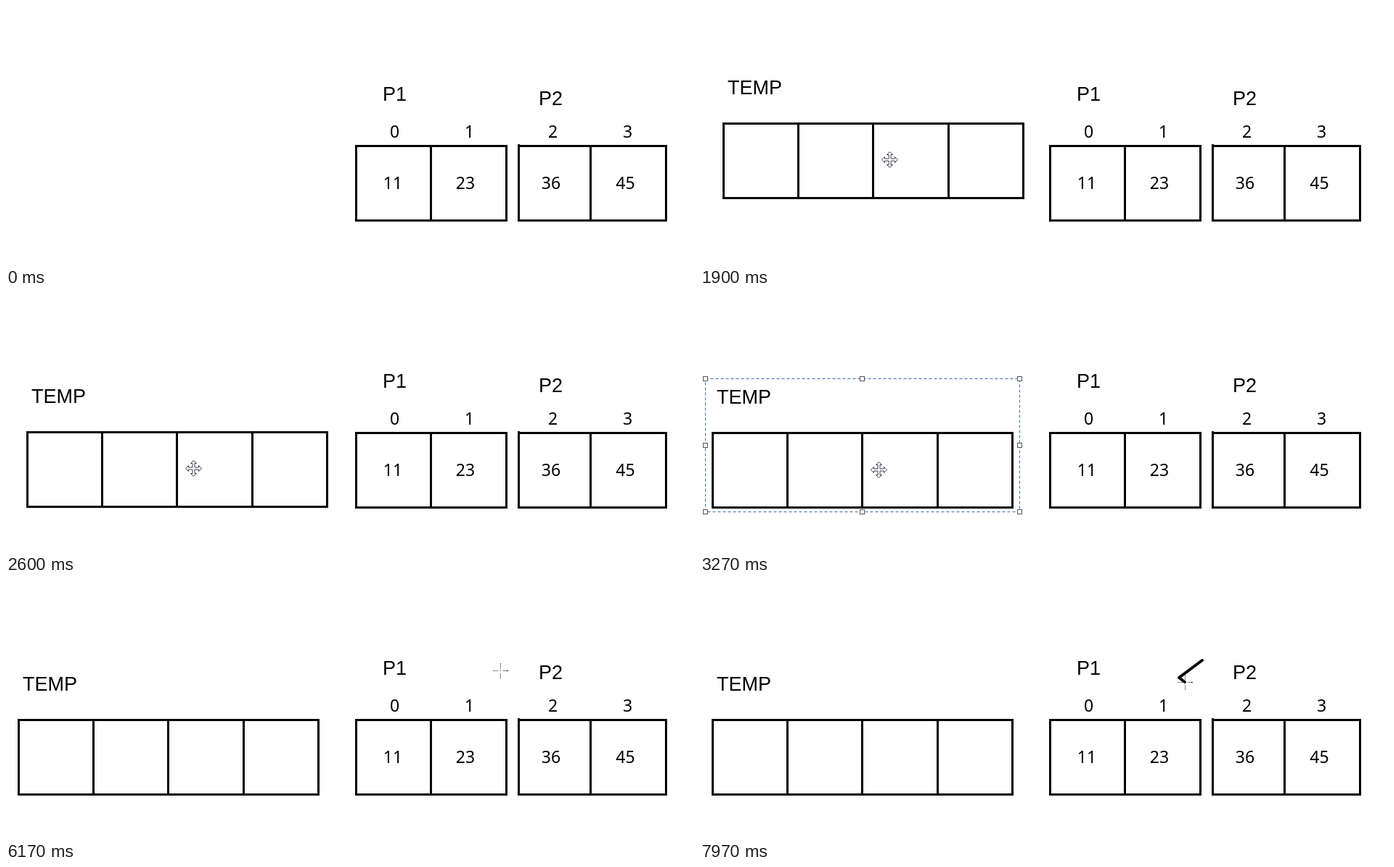
Animation of 948x358 px, one loop 8000 ms. Source, as an HTML page with a canvas:

```html
<!DOCTYPE html>
<html lang="en">
<head>
<meta charset="utf-8">
<title>Merging two parts</title>
<style>
  html, body { margin: 0; width: 100%; height: 100%; overflow: hidden; background: #fff; }
  canvas { display: block; }
</style>
</head>
<body>
<canvas id="stage" width="948" height="358"></canvas>
<script>
const ctx = document.getElementById('stage').getContext('2d');
const LOOP = 8000;
const LABEL = '27px "Liberation Sans", sans-serif';
const DIGIT = '23px "Noto Sans", sans-serif';

const GRIP = { x: 246, y: 243 };
const PEN_START = { x: 692, y: 111 };
const PEN_CORNER = { x: 660, y: 135 };
const PEN_TIP = { x: 668, y: 141 };

// The dragged row swings in from the left, overshoots and settles at zero.
const drag = [
  { t: 1170, x: -250, y: -60 }, { t: 1530, x: -61, y: -67 }, { t: 1900, x: 15, y: -31 },
  { t: 2200, x: 32, y: -12 }, { t: 2600, x: 12, y: -1 }, { t: 2900, x: 0, y: 0 }
];
// The pen dips in from the top, sweeps left and returns to its start.
const hover = [
  { t: 5300, x: 285, y: 34 }, { t: 5650, x: 430, y: 240 }, { t: 6100, x: 747, y: 126 },
  { t: 6170, x: 682, y: 125 }, { t: 6400, x: 540, y: 125 }, { t: 6930, x: 704, y: 124 },
  { t: 7200, ...PEN_START }
];

const clamp = u => Math.min(1, Math.max(0, u));
const smooth = u => u * u * (3 - 2 * u);
const add = (a, b) => ({ x: a.x + b.x, y: a.y + b.y });
const mix = (a, b, u) => ({ x: a.x + (b.x - a.x) * u, y: a.y + (b.y - a.y) * u });
const snap = p => ({ x: Math.round(p.x), y: Math.round(p.y) });
const progress = (t, from, to) => clamp((t - from) / (to - from));

// Monotone cubic through the key points: smooth, without overshoot.
function along(keys, t) {
  const last = keys.length - 1;
  if (t >= keys[last].t) return keys[last];
  const i = keys.findIndex(k => k.t > t) - 1;
  const a = keys[i], b = keys[i + 1], span = b.t - a.t, u = (t - a.t) / span;
  const coordinate = axis => {
    const slope = j => j < 0 || j >= last ? 0
      : (keys[j + 1][axis] - keys[j][axis]) / (keys[j + 1].t - keys[j].t);
    const tangent = j => {
      if (j === 0) return slope(0);
      const before = slope(j - 1), after = slope(j);
      return before * after <= 0 ? 0 : 2 * before * after / (before + after);
    };
    const bend = u * (1 - u) * ((1 - u) * tangent(i) - u * tangent(i + 1));
    return a[axis] + (b[axis] - a[axis]) * smooth(u) + span * bend;
  };
  return { x: coordinate('x'), y: coordinate('y') };
}

function text(str, x, y, font, align = 'left') {
  ctx.font = font;
  ctx.textAlign = align;
  ctx.fillStyle = '#000';
  ctx.fillText(str, x, y);
}

function row(left, top, step, count) {
  ctx.fillStyle = '#000';
  for (let i = 0; i <= count; i++) ctx.fillRect(Math.round(left + i * step), top, 3, 106);
  const width = Math.round(left + count * step) + 3 - left;
  ctx.fillRect(left, top, width, 3);
  ctx.fillRect(left, top + 103, width, 3);
}

function captions(first, values, center, valueStep) {
  values.forEach((value, i) => {
    text(first + i, center + i * 103, 182, DIGIT, 'center');
    text(value, center - 2.5 + i * valueStep, 253, DIGIT, 'center');
  });
}

function parts() {
  row(481, 192, 103.4, 2);
  text('P1', 519, 131, LABEL);
  captions(0, [11, 23], 535.5, 100);

  row(705, 192, 99, 1);
  row(804, 192, 104, 1);
  ctx.fillRect(705, 191, 3, 1);
  text('P2', 734, 137, LABEL);
  captions(2, [36, 45], 753.5, 102.5);
}

function temp({ x, y }) {
  row(16 + x, 192 + y, 103.2, 4);
  text('TEMP', 23 + x, 153 + y, LABEL);
}

function selection() {
  const left = 7.5, top = 118.5, width = 433, height = 184;
  ctx.strokeStyle = '#3c6ea8';
  ctx.lineWidth = 1;
  ctx.setLineDash([4, 3]);
  ctx.strokeRect(left, top, width, height);
  ctx.setLineDash([]);
  ctx.strokeStyle = '#555';
  ctx.fillStyle = '#fff';
  for (let i = 0; i < 9; i++) {
    if (i === 4) continue;
    const x = left + Math.floor(width * (i % 3) / 2) - 3;
    const y = top + height * Math.floor(i / 3) / 2 - 3;
    ctx.fillRect(x, y, 6, 6);
    ctx.strokeRect(x, y, 6, 6);
  }
}

function moveCursor({ x, y }) {
  ctx.save();
  ctx.translate(x + 0.5, y + 0.5);
  ctx.beginPath();
  for (let arm = 0; arm < 4; arm++) {
    ctx.lineTo(-1.5, -1.5);
    ctx.lineTo(-1.5, -7);
    ctx.lineTo(-4, -7);
    ctx.lineTo(0, -11);
    ctx.lineTo(4, -7);
    ctx.lineTo(1.5, -7);
    ctx.rotate(Math.PI / 2);
  }
  ctx.closePath();
  ctx.fillStyle = '#fff';
  ctx.fill();
  ctx.strokeStyle = '#3d3d50';
  ctx.lineWidth = 1;
  ctx.stroke();
  ctx.restore();
}

function crossCursor({ x, y }) {
  ctx.fillStyle = '#222';
  for (let d = -10; d <= 10; d += 2) {
    if (Math.abs(d) === 2) continue;
    ctx.fillRect(x + d, y, 1, 1);
    ctx.fillRect(x, y + d, 1, 1);
  }
  ctx.fillRect(x + 9, y, 2, 1);
}

// Draws both legs of the pen mark as far as they go and returns the pen position.
function penMark(t) {
  if (t < 7280) return along(hover, t);
  const corner = mix(PEN_START, PEN_CORNER, smooth(progress(t, 7280, 7770)));
  const tip = add(corner, mix({ x: 0, y: 0 },
    { x: PEN_TIP.x - PEN_CORNER.x, y: PEN_TIP.y - PEN_CORNER.y }, progress(t, 7870, 7970)));
  ctx.beginPath();
  ctx.moveTo(PEN_START.x, PEN_START.y);
  ctx.lineTo(corner.x, corner.y);
  ctx.lineTo(tip.x, tip.y);
  ctx.strokeStyle = '#000';
  ctx.lineWidth = 4;
  ctx.lineCap = ctx.lineJoin = 'round';
  ctx.stroke();
  return tip;
}

function draw(t) {
  ctx.fillStyle = '#fff';
  ctx.fillRect(0, 0, 948, 358);
  parts();
  if (t < 1170) return;

  const offset = snap(along(drag, t));
  temp(offset);
  if (t >= 3270 && t < 3900) selection();

  if (t < 3270) {
    moveCursor(add(GRIP, offset));
  } else if (t < 3430) {
    const spot = snap(mix(GRIP, { x: 282, y: 350 }, progress(t, 3270, 3430)));
    (spot.y < 302 ? moveCursor : crossCursor)(spot);
  } else if (t >= 4300 && t < 4400) {
    crossCursor(snap(mix({ x: 190, y: 318 }, { x: 59, y: 135 }, progress(t, 4300, 4370))));
  } else if (t >= 5300) {
    crossCursor(snap(penMark(t)));
  }
}

function tick() {
  draw(performance.now() % LOOP);
  requestAnimationFrame(tick);
}
tick();
</script>
</body>
</html>
```
